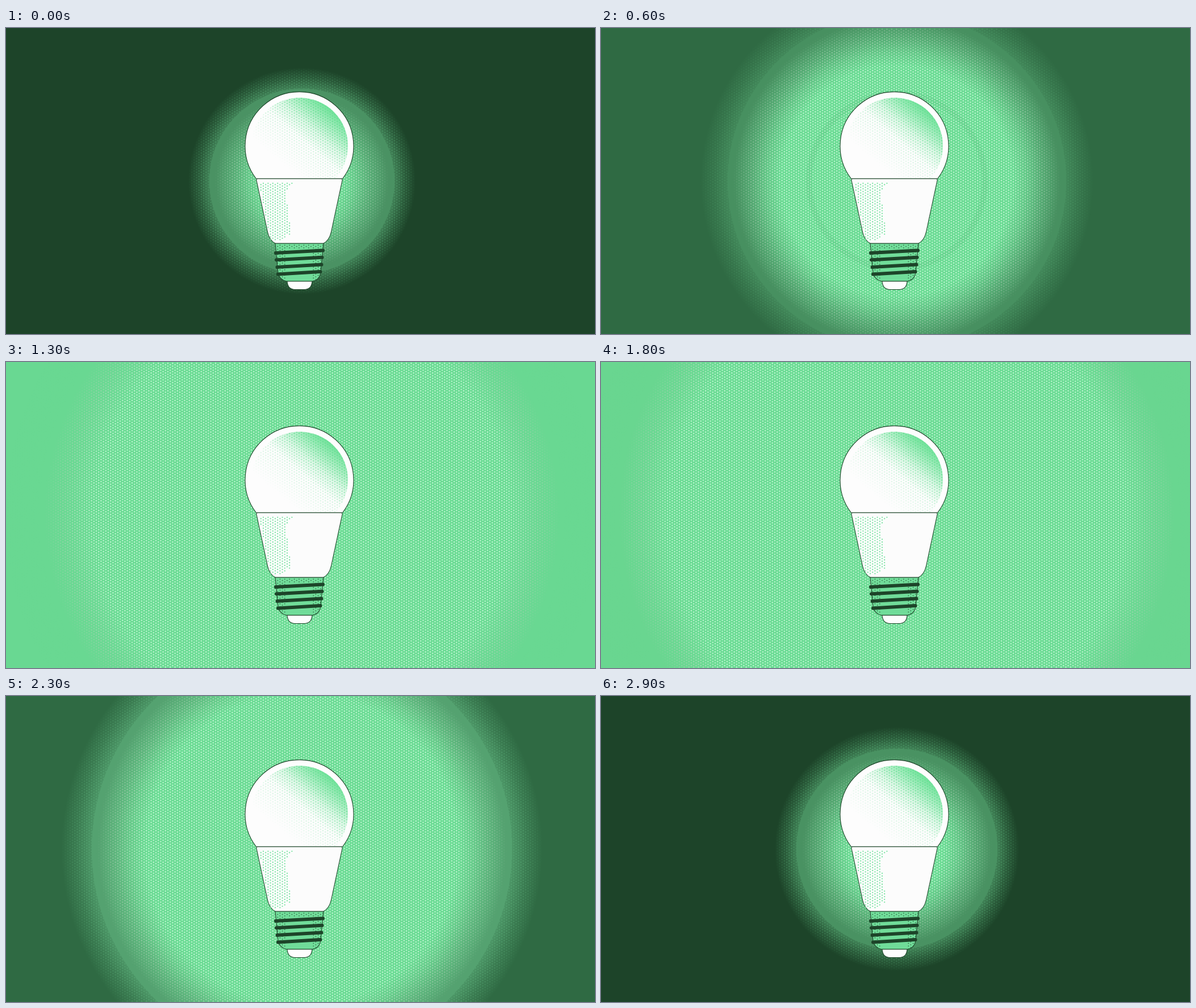
These frames come from a looping animation (1037x540 px, 3000 ms). An HTML page with a canvas:

```html
<!DOCTYPE html>
<html lang="en">
<head>
<meta charset="utf-8">
<title>Glowing bulb</title>
<style>
  html, body { margin: 0; width: 100%; height: 100%; overflow: hidden; background: #1d4429; }
  canvas { display: block; width: 1037px; height: 540px; }
</style>
</head>
<body>
<canvas id="stage" width="1037" height="540"></canvas>
<script>
const W = 1037, H = 540, LOOP = 3000, STEP = 100;
const CX = 521, CY = 270;
const DARK = '#1d4429', GREEN = '#6fe29a', WHITE = '#fdfdfd';
const BRIGHT = [106, 219, 147];

// Time in ms, value
const radiusKeys = [
  [0, 163], [600, 298], [900, 370], [1300, 462], [1500, 500],
  [1700, 512], [1900, 483], [2100, 435], [2500, 305], [2900, 177], [3000, 163]
];
const skyKeys = [
  [0, 0x1d4429], [300, 0x20492d], [600, 0x2f6a43], [900, 0x4e9a69], [1300, 0x69d892],
  [1800, 0x69d690], [2100, 0x509c6b], [2300, 0x2f6a43], [2500, 0x20492e], [2800, 0x1d4429], [3000, 0x1d4429]
];
const discKeys = [
  [0, 0x4a9263], [600, 0x479060], [900, 0x61b480], [1300, 0x69d892],
  [1800, 0x69d690], [2100, 0x61b480], [2500, 0x479060], [3000, 0x4a9263]
];

const rgb = n => [n >> 16, n >> 8 & 255, n & 255];
const mix = (a, b, k) => a.map((v, i) => v + (b[i] - v) * k);
const css = (c, a = 1) => `rgba(${c.map(Math.round).join()},${a})`;

function sample(keys, t) {
  const i = keys.findIndex(k => k[0] > t);
  const [t0, a] = keys[i - 1], [t1, b] = keys[i];
  return [a, b, (t - t0) / (t1 - t0)];
}
function number(keys, t) {
  const [a, b, k] = sample(keys, t);
  return a + (b - a) * k;
}
function colour(keys, t) {
  const [a, b, k] = sample(keys, t);
  return mix(rgb(a), rgb(b), k);
}

function layer() {
  const c = document.createElement('canvas');
  c.width = W;
  c.height = H;
  return c.getContext('2d');
}

// Hexagonal screen of dots, kept wherever test(x, y) holds
const PX = 4.2, PY = 4.85;
function dots(g, size, x0, y0, x1, y1, test = () => true) {
  g.beginPath();
  const first = Math.ceil((x0 - 453) / PX), last = Math.floor((x1 - 453) / PX);
  for (let i = first; i <= last; i++) {
    const x = 453 + i * PX, shift = 274 + (i & 1) * PY / 2;
    for (let y = shift + Math.ceil((y0 - shift) / PY) * PY; y <= y1; y += PY) {
      if (!test(x, y)) continue;
      g.moveTo(x + size, y);
      g.arc(x, y, size, 0, 7);
    }
  }
  g.fill();
}

const screen = layer();
dots(screen, 1.3, 0, 0, W, H);
const tint = layer();

// The dot screen, coloured by a gradient
function tintedDots(fill) {
  tint.globalCompositeOperation = 'copy';
  tint.drawImage(screen.canvas, 0, 0);
  tint.globalCompositeOperation = 'source-in';
  tint.fillStyle = fill;
  tint.fillRect(0, 0, W, H);
  return tint.canvas;
}

function radial(g, size, stops) {
  const grad = g.createRadialGradient(CX, CY, 0, CX, CY, size);
  for (const [r, c] of stops) grad.addColorStop(Math.min(1, Math.max(0, r / size)), c);
  return grad;
}

function linear(g, x0, y0, x1, y1, stops) {
  const grad = g.createLinearGradient(x0, y0, x1, y1);
  stops.forEach(([p, a]) => grad.addColorStop(p, `rgba(104,224,148,${a})`));
  return grad;
}

function shape(g, d, fill) {
  const p = new Path2D(d);
  g.fillStyle = fill;
  g.fill(p);
  g.stroke(p);
  return p;
}

function drawBulb() {
  const g = layer();
  g.strokeStyle = DARK;
  g.lineWidth = 1.1;

  // Globe and its shading
  shape(g, 'M440.5 266A95.5 95.5 0 1 1 592.5 266Z', WHITE);
  g.save();
  g.beginPath();
  g.arc(517, 208, 85, 0, 7);
  g.clip();
  g.drawImage(tintedDots(linear(g, 577, 148, 494, 246, [[0, 1], [0.3, 0.6], [0.6, 0.25], [1, 0]])), 0, 0);
  g.fillStyle = linear(g, 577, 148, 529, 203, [[0, 0.95], [0.3, 0.6], [0.65, 0.2], [1, 0]]);
  g.fillRect(400, 100, 240, 166);
  g.restore();

  // Screw base
  const base = shape(g, 'M474 380H559L554 430Q553 444 540 447H494Q481 444 479 432Z', '#70dc99');
  g.save();
  g.clip(base);
  g.fillStyle = DARK;
  dots(g, 0.75, 474, 382, 559, 447, (x, y) => x < 493 || x > 541 || y < 388);
  g.restore();

  // Collar
  shape(g, 'M443 266H590Q592.5 266 592 269L572.5 360Q569 375 559 380H474Q464 375 460.5 360L441 269Q440.5 266 443 266Z', '#fcfcfc');
  g.fillStyle = GREEN;
  dots(g, 1.1, 447, 273, 504, 374, (x, y) => {
    const left = 446 + (y - 274) * 0.19;
    const right = y < 275 ? 504 : y < 279 ? 500 : y < 284 ? 496 : y < 310 ? 492 : y < 342 ? 496 : y < 364 ? 500 : 496 - (y - 364);
    return x > left && x < right;
  });

  // Contact and threads
  shape(g, 'M495 447H539Q538 461.5 525 461.5H509Q496 461.5 495 447Z', WHITE);
  g.lineWidth = 6;
  g.lineCap = 'round';
  g.beginPath();
  [[475, 397, 558], [476, 409.2, 556.5], [477.5, 422, 555.5], [479, 434.5, 553.5]].forEach(([x, y, end]) => {
    g.moveTo(x, y);
    g.lineTo(end, y - 4.4);
  });
  g.stroke();
  return g.canvas;
}

const ctx = document.getElementById('stage').getContext('2d');
const bulb = drawBulb();

function drawGlow(t) {
  const r = number(radiusKeys, t);
  const disc = colour(discKeys, t);
  const edge = r + 24 + r * 0.08;

  ctx.fillStyle = css(colour(skyKeys, t));
  ctx.fillRect(0, 0, W, H);

  ctx.fillStyle = radial(ctx, edge, [
    [r - 95, css(BRIGHT)], [r - 70, css(mix(disc, BRIGHT, 0.75))],
    [r - 42, css(mix(disc, BRIGHT, 0.35))], [r - 12, css(disc)], [r, css(disc)],
    [r, css(disc, 0.78)], [r + (edge - r) * 0.5, css(disc, 0.3)], [edge, css(disc, 0)]
  ]);
  ctx.fillRect(0, 0, W, H);

  const pale = [200, 248, 217], grey = [176, 208, 184];
  ctx.drawImage(tintedDots(radial(tint, edge, [
    [r - 95, css(pale, 0.8)], [r - 42, css(grey, 0.5)], [r - 8, css(grey, 0)],
    [r, css(disc, 0)], [r, css(disc, 0.9)], [edge, css(disc, 0)]
  ])), 0, 0);

  // Faint ripple following the glow outward
  const ripple = Math.max(0, 1 - Math.abs(t - 850) / 450);
  if (ripple) {
    ctx.strokeStyle = `rgba(50,130,80,${0.16 * ripple})`;
    ctx.lineWidth = 10;
    ctx.beginPath();
    ctx.arc(CX, CY, 155 + (t - 600) * 0.34, 0, 7);
    ctx.stroke();
  }
}

const start = performance.now();
let shown = -1;
function frame() {
  const t = Math.floor((performance.now() - start) % LOOP / STEP) * STEP;
  if (t !== shown) {
    shown = t;
    drawGlow(t);
    ctx.drawImage(bulb, 0, 0);
  }
  requestAnimationFrame(frame);
}
frame();
</script>
</body>
</html>
```
